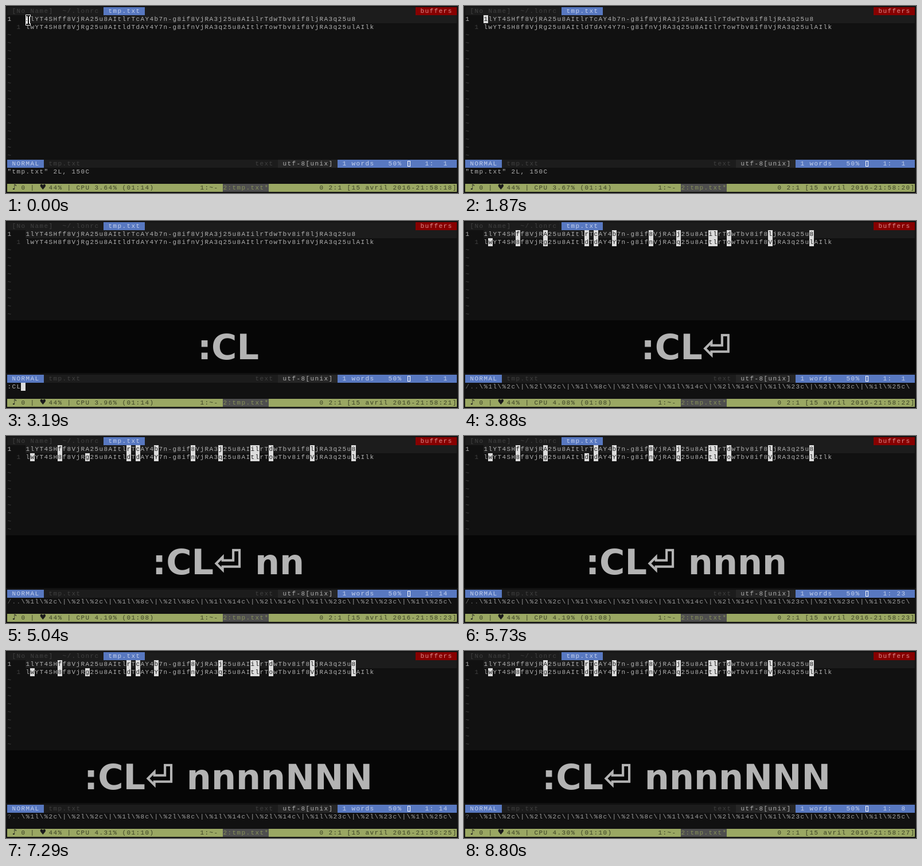
An HTML page with a canvas that plays this animation: 788 px wide and 326 px high, repeating every 9060 ms.

```html
<!DOCTYPE html>
<html lang="en">
<head>
<meta charset="utf-8">
<title>Terminal session</title>
<style>
  html, body { margin: 0; width: 100%; height: 100%; overflow: hidden; background: #111; }
  canvas { display: block; }
</style>
</head>
<body>
<canvas id="stage" width="788" height="326"></canvas>
<script>
const ctx = document.getElementById('stage').getContext('2d');
const LOOP = 9060, CELL_W = 8, CELL_H = 14, PAD = 2, COLS = 98;
const MONO = '11px "Liberation Mono", monospace';
const SYMBOL = '13px "DejaVu Sans", sans-serif';
const KEYS = 'bold 60.5px "DejaVu Sans", sans-serif';
const C = {
  back: '#111111', bar: '#1c1c1c', panel: '#262626', text: '#b2b2b2', dim: '#404040',
  blue: '#5878c0', pale: '#c4d0ec', red: '#870000', pink: '#dc8c8c',
  olive: '#9aa763', ink: '#3c4226', grey: '#4e4e4e', light: '#dcdcdc', dark: '#1c1c1c'
};

const lines = [
  '1lYT4SHff8VjRA25u8AItlrTcAY4b7n-g8if8VjRA3j25u8AIilrTdwTbv8if8ljRA3q25u8',
  'lwYT4SH8f8VjRg25u8AItldTdAY4Y7n-g8ifnVjRA3q25u8AItlrTowTbv8if8VjRA3q25ulAIlk'
];
const differs = [8, 14, 23, 25, 29, 37, 43, 50, 51, 54, 63, 72];
const pattern = [2, 8, 14, 23, 25]
  .flatMap(col => [1, 2].map(row => `\\%${row}l\\%${col}c\\|`)).join('').slice(0, 94);

// Each track is a list of [start time, value].
const keys = [[0, ''], [2240, ':'], [2850, ':C'], [3150, ':CL'], [3650, ':CL⏎'],
  [4650, ':CL⏎ n'], [4990, ':CL⏎ nn'], [5340, ':CL⏎ nnn'], [5730, ':CL⏎ nnnn'],
  [6420, ':CL⏎ nnnnN'], [6760, ':CL⏎ nnnnNN'], [7290, ':CL⏎ nnnnNNN']];
const command = [[0, ''], [2290, ':'], [2900, ':C'], [3190, ':CL'], [3700, '/'], [6480, '?']];
const cursor = [[0, 1], [2290, 0], [4700, 8], [5040, 14], [5390, 23], [5780, 25],
  [6480, 23], [6810, 14], [7340, 8]];
const load = [[0, '3.64% (01:14)'], [850, '4.02% (01:14)'], [1870, '3.67% (01:14)'],
  [2950, '3.96% (01:14)'], [3830, '4.08% (01:08)'], [4800, '4.19% (01:08)'],
  [5780, '4.26% (01:10)'], [6810, '4.31% (01:10)'], [7740, '4.32% (01:10)'],
  [8750, '4.30% (01:10)']];

const indexAt = (track, t) => track.findLastIndex(([start]) => start <= t);
const valueAt = (track, t) => track[indexAt(track, t)][1];

function fill(x, y, w, h, color) {
  ctx.fillStyle = color;
  ctx.fillRect(x, y, w, h);
}

function put(col, row, text, color, back, font = MONO) {
  const x = PAD + col * CELL_W, y = PAD + row * CELL_H;
  if (back) fill(x, y, text.length * CELL_W, CELL_H, back);
  ctx.font = font;
  ctx.fillStyle = color;
  [...text].forEach((ch, i) => ctx.fillText(ch, x + i * CELL_W + 0.5, y + 10));
}

function drawPointer(x, y) {
  const beam = [[0, 0, 7, 2], [3, 0, 2, 17], [0, 15, 7, 2]];
  for (const [dx, dy, w, h] of beam) fill(x + dx - 1, y + dy - 1, w + 2, h + 2, '#fff');
  for (const [dx, dy, w, h] of beam) fill(x + dx, y + dy, w, h, '#000');
}

function drawTabs() {
  put(0, 0, ' '.repeat(COLS), C.dim, C.bar);
  put(1, 0, '[No Name]  ~/.lonrc', C.dim);
  put(21, 0, ' tmp.txt ', C.pale, C.blue);
  put(89, 0, ' buffers ', C.pink, C.red);
}

function drawText(t) {
  const at = valueAt(cursor, t);
  put(4, 1, ' '.repeat(94), C.text, C.bar);
  put(0, 1, '1', C.text);
  put(2, 2, '1', C.dim);
  lines.forEach((line, i) => put(4, i + 1, line, C.text));
  if (t >= 3700) {
    lines.forEach((line, i) => {
      for (const col of i ? [2, ...differs] : differs) {
        if (i || col !== at) put(3 + col, i + 1, line[col - 1], C.dark, C.light);
      }
    });
  } else if (at) {
    put(4, 1, lines[0][0], C.dark, C.light);
  }
  for (let row = 3; row < 19; row++) put(0, row, '~', C.dim);
}

function drawStatus(t) {
  const col = t < 4700 ? 1 : valueAt(cursor, t);
  put(0, 19, ' '.repeat(COLS), C.dim, C.bar);
  put(0, 19, ' NORMAL ', C.pale, C.blue);
  put(9, 19, 'tmp.txt', C.dim);
  put(54, 19, 'text', C.dim);
  put(59, 19, ' utf-8[unix] ', C.text, C.panel);
  put(72, 19, ` 1 words   50%     1:${String(col).padStart(3)}  `, C.pale, C.blue);
  ctx.strokeStyle = '#fff';
  ctx.strokeRect(700.5, 270.5, 4, 9);
}

function drawCommand(t) {
  const text = valueAt(command, t);
  if (!text) {
    put(0, 20, '"tmp.txt" 2L, 150C', C.text);
  } else if (text[0] === ':') {
    put(0, 20, text, C.text);
    put(text.length, 20, ' ', C.text, C.light);
  } else {
    put(0, 20, text + '..', '#666');
    put(3, 20, pattern, '#a0a0a0');
  }
}

function drawSession(t) {
  put(0, 22, ' '.repeat(COLS), C.ink, C.olive);
  put(1, 22, '♪', C.dark, null, SYMBOL);
  put(7, 22, '♥', C.dark, null, SYMBOL);
  put(3, 22, '0 |   44% | CPU ' + valueAt(load, t), C.ink);
  put(42, 22, '1:~-', C.ink);
  put(47, 22, '2:tmp.txt*', '#87915a', C.grey);
  put(68, 22, `0 2:1 [15 avril 2016-21:58:${18 + indexAt(load, t)}]`, C.ink);
}

function drawKeys(t) {
  const text = valueAt(keys, t);
  if (!text) return;
  fill(0, 173, 788, 92, '#060606');
  ctx.font = KEYS;
  ctx.fillStyle = '#b3b3b3';
  ctx.fillText(text, 387.5 - ctx.measureText(text).width / 2, 240.5);
}

function draw(t) {
  fill(0, 0, 788, 326, C.back);
  drawTabs();
  drawText(t);
  drawStatus(t);
  drawCommand(t);
  drawSession(t);
  drawKeys(t);
  if (t < 200) drawPointer(35, 16);
  else if (t >= 590 && t < 900) {
    const step = Math.floor((t - 590) / 45);
    drawPointer(112 + step * 2, 18 - step * 6);
  }
}

function frame(now) {
  draw(now % LOOP);
  requestAnimationFrame(frame);
}
requestAnimationFrame(frame);
</script>
</body>
</html>
```
